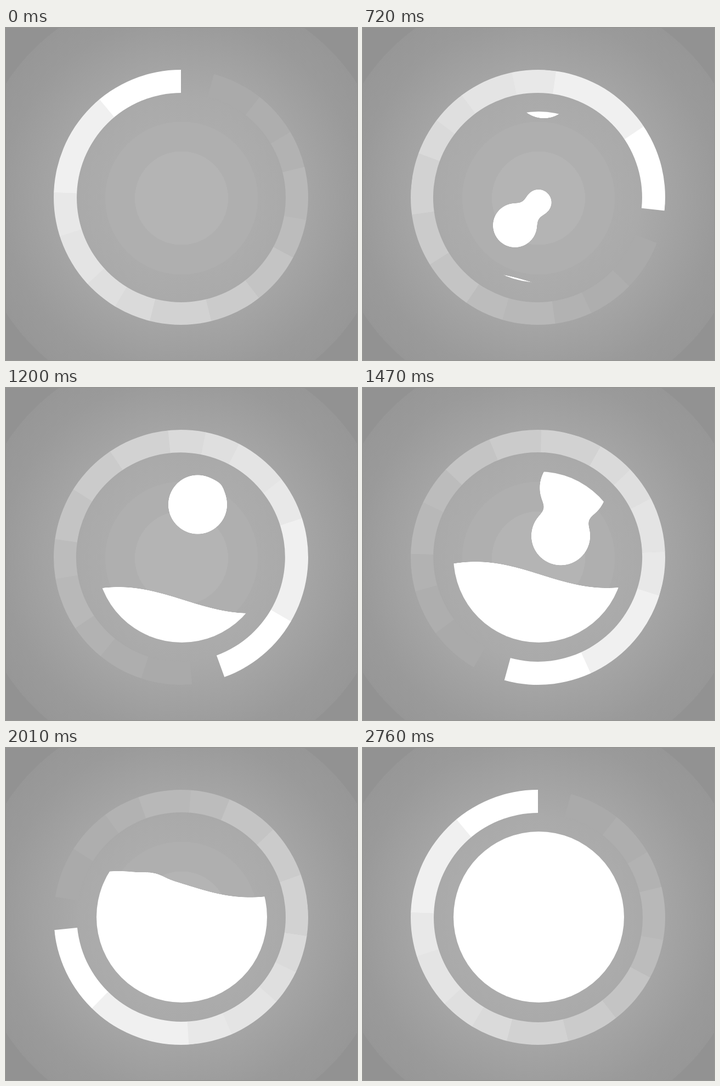
Write an HTML page that moves like this. It is 640 px wide and 604 px high and loops after 2.79 s.

```html
<!DOCTYPE html>
<html lang="en">
<head>
<meta charset="utf-8">
<title>Liquid loader</title>
<style>
  html, body { margin: 0; width: 100%; height: 100%; overflow: hidden; background: #929292; }
  svg { display: block; width: 640px; height: 604px; }
</style>
</head>
<body>
<svg viewBox="0 0 640 604">
  <defs>
    <radialGradient id="backdrop" gradientUnits="userSpaceOnUse" cx="320" cy="309.5" r="400">
      <stop offset=".2125" stop-color="#b4b4b4"/>
      <stop offset=".2125" stop-color="#afafaf"/>
      <stop offset=".3475" stop-color="#afafaf"/>
      <stop offset=".3475" stop-color="#acacac"/>
      <stop offset=".46" stop-color="#aaaaaa"/>
      <stop offset=".62" stop-color="#a3a3a3"/>
      <stop offset=".82" stop-color="#9a9a9a"/>
      <stop offset=".955" stop-color="#979797"/>
      <stop offset=".955" stop-color="#929292"/>
    </radialGradient>
    <filter id="goo" filterUnits="userSpaceOnUse" x="60" y="40" width="520" height="520">
      <feGaussianBlur stdDeviation="9"/>
      <feColorMatrix values="0 0 0 0 1  0 0 0 0 1  0 0 0 0 1  0 0 0 40 -19.5"/>
    </filter>
    <clipPath id="bowl"><circle cx="320.5" cy="307.5" r="155.5"/></clipPath>
    <clipPath id="annulus">
      <path clip-rule="evenodd" d="M-232 0A232 232 0 1 1 232 0A232 232 0 1 1-232 0Z
        M-190 .5A190.5 190.5 0 1 1 191 .5A190.5 190.5 0 1 1-190 .5Z"/>
    </clipPath>
  </defs>
  <rect width="640" height="604" fill="url(#backdrop)"/>
  <g id="ring" clip-path="url(#annulus)"></g>
  <g clip-path="url(#bowl)">
    <g id="liquid" filter="url(#goo)" fill="#fff"><path id="surface"/></g>
  </g>
</svg>
<script>
const LOOP = 2790, STEP = 30, BLUR = 9;
const ring = document.getElementById('ring');
const liquid = document.getElementById('liquid');
const surface = document.getElementById('surface');

function add(parent, tag, attrs) {
  const node = document.createElementNS('http://www.w3.org/2000/svg', tag);
  for (const key in attrs) node.setAttribute(key, attrs[key]);
  return parent.appendChild(node);
}

// Tail bands: degrees behind the head where each one ends, and its grey.
const bands = [
  [40, 255], [88, 240], [108, 232], [133, 228], [149, 223], [166, 218], [194, 210],
  [218, 203], [242, 196], [260, 188], [284, 184], [301, 178], [322, 174], [345, 170]
];

function rim(degrees) {
  const a = degrees * Math.PI / 180;
  return `${250 * Math.sin(a)} ${-250 * Math.cos(a)}`;
}

bands.forEach(([end, grey], i) => {
  const start = i ? bands[i - 1][0] - 0.2 : 0;
  add(ring, 'path', {
    d: `M0 0L${rim(-end)}A250 250 0 0 1 ${rim(-start)}Z`,
    fill: `rgb(${grey},${grey},${grey})`
  });
});

// Each drop passes through (x, y) at time t with a steady velocity in px/ms.
const drops = [
  { t: 480, x: 291, y: 264, vx: -.058, vy: .396, r: 40 },
  { t: 480, x: 319, y: 238, vx: .004, vy: .331, r: 23.5 },
  { t: 1200, x: 349.5, y: 212, vx: .041, vy: .211, r: 53.5 },
  { t: 1740, x: 320.5, y: 234.5, vx: -.233, vy: .196, r: 61 },
  { t: 2280, x: 328, y: 155, vx: 0, vy: .2, r: 47 },
  { t: 2280, x: 402, y: 132, vx: 0, vy: .2, r: 53 }
];
// Blurring shrinks a disc slightly, so enlarge it to compensate.
for (const d of drops) d.node = add(liquid, 'circle', { r: d.r + BLUR * BLUR / (2 * d.r) });

function surfacePath(level) {
  let d = 'M60 950';
  for (let x = 60; x <= 580; x += 10) {
    d += `L${x} ${(level - 24 * Math.cos(Math.PI * (x - 205) / 240)).toFixed(2)}`;
  }
  return d + 'L580 950Z';
}

function draw(t) {
  const frame = t / STEP;
  const angle = frame < 45 ? frame * 4 : 180 + (frame - 45) * 180 / 47;
  ring.setAttribute('transform', `translate(319 308) rotate(${angle})`);
  surface.setAttribute('d', surfacePath(386 - .1705 * (t - 1200)));
  for (const d of drops) {
    d.node.setAttribute('cx', d.x + d.vx * (t - d.t));
    d.node.setAttribute('cy', d.y + d.vy * (t - d.t));
  }
}

const begin = performance.now();
function tick() {
  const t = (performance.now() - begin) % LOOP;
  draw(Math.floor(t / STEP) * STEP);
  requestAnimationFrame(tick);
}
tick();
</script>
</body>
</html>
```
